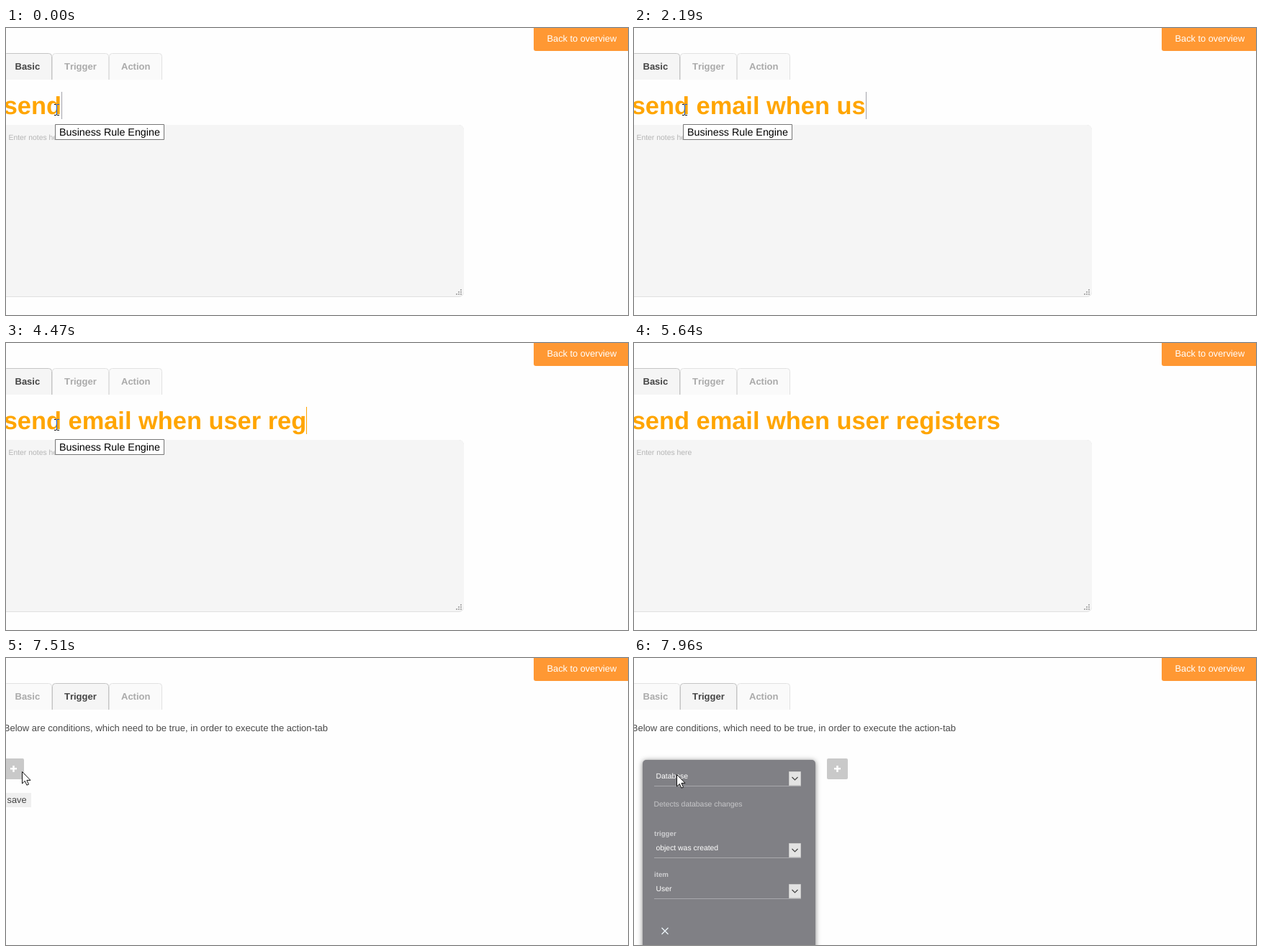
Animation of 864x400 px, one loop 8 s. Source, as an HTML page with a canvas:

```html
<!DOCTYPE html>
<html lang="en">
<head>
<meta charset="utf-8">
<title>Rule editor</title>
<style>
  html, body { margin: 0; width: 100%; height: 100%; overflow: hidden; background: #fefefe; }
  canvas { display: block; }
</style>
</head>
<body>
<canvas id="stage" width="864" height="400"></canvas>
<script>
const ctx = document.getElementById('stage').getContext('2d');
const LOOP = 8000, ORANGE = '#ffa500';
const OPEN_TRIGGER = 6270, OPEN_PANEL = 7570;
const TITLE = { x: -3.3, y: 120, size: 34.4 };

// Keystrokes: '<' deletes, '|' toggles the caret, the rest is typed.
const KEYS = [
  [0, 'send'], [70, ' e'], [260, 'm'], [360, 'a'], [450, 'i'], [550, 'l'], [650, ' '],
  [970, '|'], [1350, 'w'], [1510, 'h'], [1600, 'e'], [1690, 'n'], [1780, ' '],
  [2020, '|'], [2110, 'u'], [2190, 's'], [2330, 'er'], [2570, '|'], [2730, ' '],
  [3120, 'r'], [3190, 'e'], [3600, '|'], [3680, 'i'], [3750, 'g'], [4150, '|'],
  [4230, '<'], [4470, '<g'], [4630, 'i'], [4720, 's|'], [4870, 'te'], [5010, 'r'],
  [5160, 's'], [5240, '|'], [5800, '|']
];

// Pointer positions, held until the next one.
const POINTER = [
  [5800, 86, 96], [5870, 98, 45], [5950, 108, 24], [6020, 113, 46], [6190, 114, 52],
  [6800, 111, 57], [6877, 98, 79], [6953, 76, 108], [7030, 54, 133],
  [7107, 36, 148], [7183, 26, 156], [7260, 22, 158],
  [7810, 32, 160], [7890, 48, 161], [7960, 59, 162]
];

const ARROW = new Path2D('M0 0V16.5L3.8 12.9 6.4 18.7 9 17.6 6.4 11.9H11.5Z');
const HAND = new Path2D('M4.5 14V2.2Q4.7.5 6.3.5T8.1 2.2V8Q9.7 6.7 11.3 8.5' +
  'Q13 7.6 14 9.6Q16.5 9.2 16.5 11.5V16Q16.4 18 14.5 20.5V23.5H6.5V21' +
  'Q4.6 18.8 3 16L.8 12.6Q.4 10.7 2.2 11.1Z');

function text(str, x, y, size, color, bold) {
  ctx.font = `${bold ? 'bold ' : ''}${size}px "Liberation Sans", Arial, sans-serif`;
  ctx.textRendering = 'geometricPrecision';
  ctx.fontKerning = 'none';
  ctx.fillStyle = color;
  ctx.fillText(str, x, y);
}

function rect(x, y, w, h, color) {
  ctx.fillStyle = color;
  ctx.fillRect(x, y, w, h);
}

function round(x, y, w, h, r, fill, stroke) {
  ctx.beginPath();
  ctx.roundRect(x, y, w, h, r);
  ctx.fillStyle = fill;
  ctx.fill();
  if (stroke) line(stroke, 1);
}

function line(color, width, path) {
  ctx.strokeStyle = color;
  ctx.lineWidth = width;
  path ? ctx.stroke(path) : ctx.stroke();
}

function tab(label, x, w, tx, active) {
  round(x + .5, 35.5, w - 1, 40, [4, 4, 0, 0],
    active ? '#f5f5f5' : '#fafafa', active ? '#c4c4c4' : '#e2e2e2');
  text(label, tx, 58, 13, active ? '#444' : '#aaa', true);
}

function drawHeader(current) {
  round(733, 0, 140, 32, [0, 0, 0, 3], '#ff9833');
  text('Back to overview', 751.5, 19, 12.8, '#fff');
  ctx.save();
  ctx.beginPath();
  ctx.rect(0, 30, 300, 42);
  ctx.clip();
  const tabs = [['Basic', -4, 68, 12.5], ['Trigger', 64, 79, 81], ['Action', 143, 74, 160]];
  tabs.forEach((t, i) => { if (i !== current) tab(...t, false); });
  tab(...tabs[current], true);
  ctx.restore();
}

function drawTitle(t) {
  let str = '', caret = true;
  for (const [at, ops] of KEYS) {
    if (at > t) break;
    for (const c of ops) {
      if (c === '|') { caret = !caret; continue; }
      str = c === '<' ? str.slice(0, -1) : str + c;
      caret = true;
    }
  }
  text(str, TITLE.x, TITLE.y, TITLE.size, ORANGE, true);
  if (caret) {
    const x = Math.round(TITLE.x + ctx.measureText(str).width);
    rect(x, 89, 1, 38, t < 2570 ? '#a3a3ab' : ORANGE);
  }
}

function drawBasic(t) {
  round(-10, 135, 646, 240, 7, '#e0e0e0');
  round(-10, 135, 646, 239, 7, '#f5f5f5');
  text('Enter notes here', 3.5, 156, 10.4, '#b4b4b4');
  for (let row = 0; row < 3; row++)
    for (let i = 0; i <= row; i++) rect(631 - 3 * i, 364 + 3 * row, 2, 2, '#b0b0b0');
  drawTitle(t);
  if (t < 5640) {
    round(68.5, 134.5, 151, 21, 0, '#fff', '#767676');
    text('Business Rule Engine', 74, 150, 14.3, '#000');
  }
}

function addButton(x) {
  round(x, 140, 29, 29, 2, '#c9c9c9');
  rect(x + 10, 153, 9, 2.5, '#fff');
  rect(x + 13.25, 150, 2.5, 9, '#fff');
}

function select(value, x, y) {
  text(value, x, y, 10.4, '#fff');
  rect(28, y + 10, 204, 1, '#a8a8ac');
  round(215.5, y - 9.5, 16, 19, 0, '#e3e3e3', '#c9c9c9');
  line('#444', 1.2, new Path2D(`M219.5 ${y - 2}l4 4 4-4`));
}

function drawPanel() {
  ctx.save();
  ctx.shadowColor = 'rgba(0,0,0,.5)';
  ctx.shadowBlur = 7;
  ctx.shadowOffsetY = 1;
  round(12, 142, 240, 300, 5, '#808085');
  ctx.restore();
  select('Database', 30.5, 168);
  text('Detects database changes', 27.5, 207, 10.4, '#c6c6c9');
  text('trigger', 28, 248, 9.7, '#cdcdd0', true);
  select('object was created', 30.5, 268);
  text('item', 28, 305, 9.7, '#cdcdd0', true);
  select('User', 30.5, 325);
  line('#eef6fc', 1.2, new Path2D('M38.5 376l9 9m0-9l-9 9'));
}

function drawTrigger(t) {
  text('Below are conditions, which need to be true, in order to execute the action-tab',
    TITLE.x, 102, 13.06, '#4a4a4a');
  if (t < OPEN_PANEL) {
    addButton(-4);
    rect(-4, 188, 39, 20, '#efefef');
    text('save', 1.5, 202, 12.8, '#444');
  } else {
    drawPanel();
    addButton(268);
  }
}

function drawBeam(x, y) {
  ctx.save();
  ctx.globalCompositeOperation = 'difference';
  rect(x, y - 7, 1, 14, '#fff');
  for (const dy of [-8, 7]) {
    rect(x - 3, y + dy, 3, 1, '#fff');
    rect(x + 1, y + dy, 3, 1, '#fff');
  }
  ctx.restore();
}

function drawShape(path, x, y) {
  ctx.save();
  ctx.translate(x, y);
  ctx.lineJoin = 'round';
  ctx.fillStyle = '#fff';
  ctx.fill(path);
  line('#111', 1, path);
  if (path === HAND) line('#111', 1, new Path2D('M8.1 7v5M11.3 8.5v4M14 9.6v3'));
  ctx.restore();
}

function drawPointer(t) {
  if (t < 5490) return drawBeam(70, 114);
  const spot = POINTER.filter(p => p[0] <= t).pop();
  if (!spot) return;
  const [, x, y] = spot;
  const onTab = y > 35 && y < 72;
  const onAdd = x < 25 && y > 140 && t < 7410;
  if (y > 88 && y < 110) drawBeam(x, y);
  else if (onTab || onAdd) drawShape(HAND, x - 6, y);
  else drawShape(ARROW, x + .5, y + .5);
}

function draw(t) {
  const trigger = t >= OPEN_TRIGGER;
  rect(0, 0, 864, 400, '#fefefe');
  drawHeader(trigger ? 1 : 0);
  trigger ? drawTrigger(t) : drawBasic(t);
  drawPointer(t);
}

const start = performance.now();
function tick() {
  draw((performance.now() - start) % LOOP);
  requestAnimationFrame(tick);
}
tick();
</script>
</body>
</html>
```
